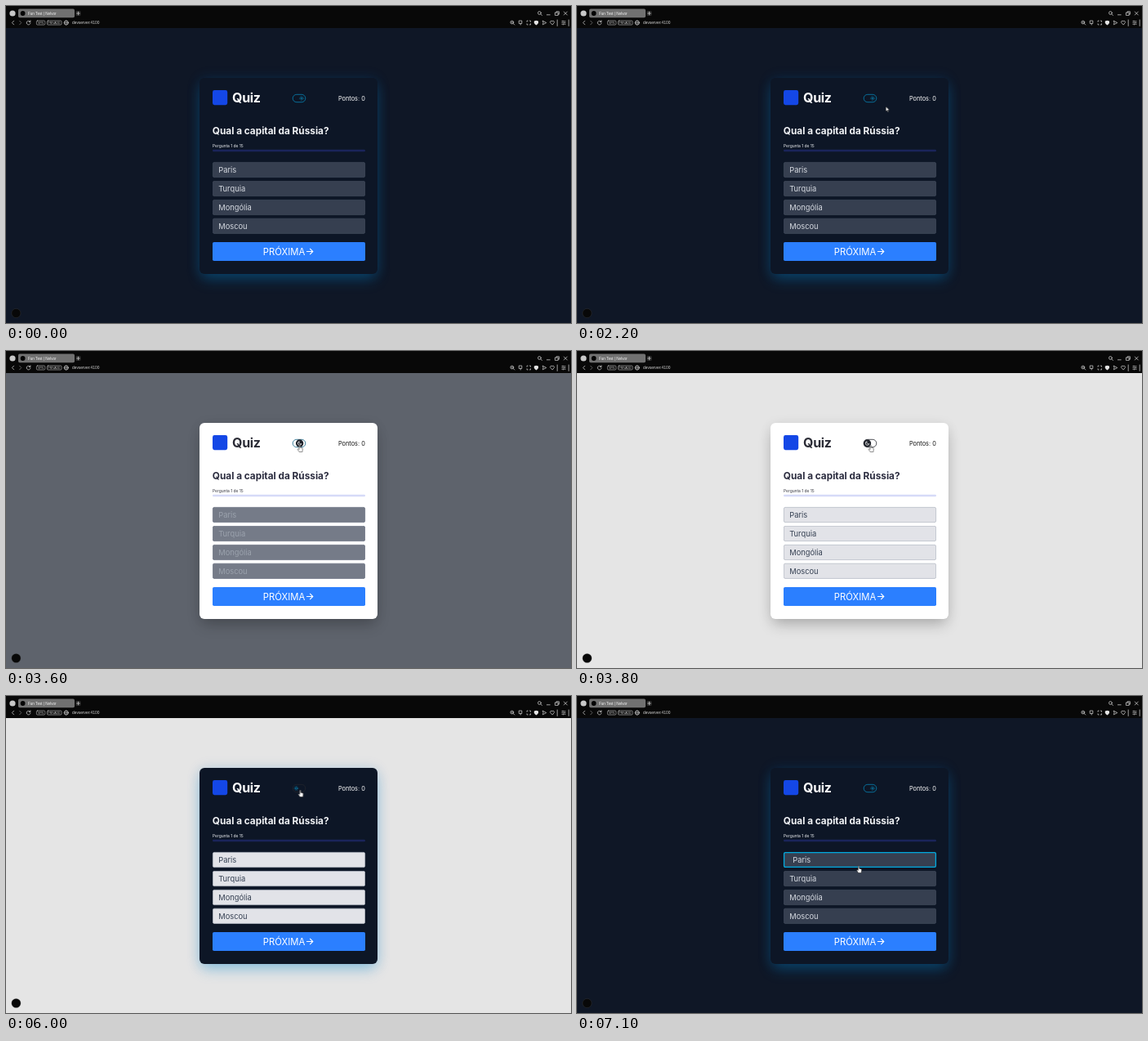
Write an HTML page that moves like this. It is 692 px wide and 388 px high and loops after 8 s.

```html
<!DOCTYPE html>
<html lang="pt">
<head>
<meta charset="utf-8">
<title>Quiz</title>
<style>
/* --c flips the card at once, --p eases page and options (0 dark, 1 light) */
@property --c { syntax: "<number>"; inherits: true; initial-value: 0; }
@property --p { syntax: "<number>"; inherits: true; initial-value: 0; }
@property --hand { syntax: "<number>"; inherits: true; initial-value: 0; }

html, body { margin: 0; width: 100%; height: 100%; overflow: hidden; background: #0f1726; }

#stage {
  --hard: calc(var(--c) * 100%);
  --soft: calc(var(--p) * 100%);
  position: relative; width: 692px; height: 388px; overflow: hidden;
  background: color-mix(in srgb, #e5e5e5 var(--soft), #0f1726);
  animation: flip 8s step-end infinite, fade 8s infinite, pointer 8s step-end infinite;
}
#stage, .knob, .cursor, .ring, .shift {
  animation-play-state: paused;
  animation-delay: calc(var(--t, 0) * -1ms);
}

#card {
  position: absolute; left: 237px; top: 88px; width: 218px; height: 240px; border-radius: 6px;
  background: color-mix(in srgb, #fff var(--hard), #0d1626);
  box-shadow:
    0 9px 18px -3px color-mix(in srgb, rgb(0 0 0 / .24) var(--hard), rgb(0 140 210 / .32)),
    0 1px 16px color-mix(in srgb, rgb(0 0 0 / .06) var(--hard), rgb(0 110 190 / .2));
}
svg { position: absolute; inset: 0; display: block; }
text { font-family: Inter, sans-serif; }

.title { font-size: 16px; font-weight: 700; letter-spacing: -.3px; fill: color-mix(in srgb, #2b2c36 var(--hard), #fff); }
.score { font-size: 7.35px; fill: color-mix(in srgb, #111 var(--hard), #fff); }
.ask { font-size: 11.8px; font-weight: 700; fill: color-mix(in srgb, #2b2c3f var(--hard), #f1f3f6); }
.step { font-size: 4.9px; fill: color-mix(in srgb, #33343e var(--hard), #f1f3f6); }
.track { fill: color-mix(in srgb, #d6dbf8 var(--hard), #1a245a); }
.opt rect {
  fill: color-mix(in srgb, #e2e3e8 var(--soft), #363f50);
  stroke: color-mix(in srgb, #b7bbc6 var(--soft), #3f495a); stroke-width: .8;
}
.opt text { font-size: 9.35px; fill: color-mix(in srgb, #364153 var(--soft), #d6dae1); }
.opt .ring { fill: none; stroke: #00a9de; stroke-width: 1.3; opacity: 0; animation: ring 8s infinite; }
.shift { animation: shift 8s infinite; }
.next { font-size: 11.3px; fill: #fff; }

.pill { fill: none; stroke: color-mix(in srgb, #22252c var(--soft), #0783b4); stroke-width: .8; }
.knob { transform: translate(calc(362px - var(--p) * 6.5px), 113px); }
.sun { opacity: calc(1 - var(--c)); stroke: #0a93c6; fill: none; }
.moon { opacity: var(--c); }

.line { fill: none; stroke: #c4c4c4; stroke-width: .8; stroke-linecap: round; stroke-linejoin: round; }
.bar text { font-family: "Liberation Sans", Arial, sans-serif; }

.cursor { opacity: 0; animation: travel 8s linear infinite; }
.cursor path { fill: #fff; stroke: #111; stroke-width: .5; stroke-linejoin: round; }
.arrow { opacity: calc(1 - var(--hand)); }
.point { opacity: var(--hand); }

@keyframes flip { 0% { --c: 0 } 44.5% { --c: 1 } 74.5%, 100% { --c: 0 } }
@keyframes fade {
  0%, 43.875% { --p: 0; animation-timing-function: cubic-bezier(.4, 0, .2, 1) }
  47.625%, 75% { --p: 1; animation-timing-function: cubic-bezier(.4, 0, .2, 1) }
  78.75%, 100% { --p: 0 }
}
@keyframes pointer {
  0% { --hand: 0 } 33% { --hand: 1 } 55.5% { --hand: 0 }
  63% { --hand: 1 } 79% { --hand: 0 } 83%, 100% { --hand: 1 }
}
@keyframes ring {
  0%, 85% { opacity: 0; animation-timing-function: cubic-bezier(.4, 0, .2, 1) }
  88.75%, 100% { opacity: 1 }
}
@keyframes shift {
  0%, 85% { transform: none; animation-timing-function: cubic-bezier(.4, 0, .2, 1) }
  88.75%, 100% { transform: translateX(4px) }
}
@keyframes travel {
  0%, 4.4% { opacity: 0; transform: translate(493px, 278px) }
  4.5%, 5% { opacity: 1; transform: translate(493px, 278px); animation-timing-function: ease-out }
  11.25%, 21.25% { opacity: 1; transform: translate(473px, 255px) }
  27.5% { opacity: 1; transform: translate(378.4px, 123px); animation-timing-function: ease-out }
  32.5% { opacity: 1; transform: translate(361px, 114px) }
  33.75%, 53.75% { opacity: 1; transform: translate(359.6px, 115px); animation-timing-function: ease-in-out }
  58.75% { opacity: 1; transform: translate(374.5px, 142.5px); animation-timing-function: ease-in-out }
  63.75%, 77.5% { opacity: 1; transform: translate(360.4px, 115px); animation-timing-function: ease-in-out }
  85%, 100% { opacity: 1; transform: translate(345px, 208px) }
}
</style>
</head>
<body>
<div id="stage">
  <div id="card"></div>
  <svg width="692" height="388" viewBox="0 0 692 388">
    <!-- browser bar -->
    <g class="bar">
      <rect width="692" height="27" fill="#080808"/>
      <circle cx="8" cy="9" r="3.6" fill="#c8c8c8"/>
      <rect x="15" y="3.6" width="69" height="10.6" rx="1.8" fill="#717171"/>
      <circle cx="20.6" cy="9" r="2.9" fill="#050505"/>
      <text x="27" y="10.6" font-size="4.6" fill="#f2f2f2">Fun Test | Nelvor</text>
      <rect x="85.4" y="6" width="6" height="6" rx="1" fill="#2c2c2c"/>
      <g class="line">
        <path d="M86.7 9h3.6M88.5 7.2v3.6"/>
        <path d="M9.6 18.2 7.4 20.5 9.6 22.8"/>
        <path d="M16.6 18.2 18.8 20.5 16.6 22.8" stroke="#777"/>
        <path d="M29.5 19a2.4 2.4 0 1 0 .5 2M29.9 17.8v1.7h-1.7"/>
        <rect x="37.4" y="18" width="10.4" height="5" rx="1.2" stroke-width=".6"/>
        <rect x="50.4" y="18" width="17.6" height="5" rx="1.2" stroke-width=".6"/>
        <circle cx="73.8" cy="20.5" r="2.6"/>
        <ellipse cx="73.8" cy="20.5" rx="1.1" ry="2.6" stroke-width=".5"/>
        <path d="M71.2 20.5h5.2" stroke-width=".5"/>
        <circle cx="653.4" cy="8.5" r="1.9"/><path d="M654.8 9.9 656.4 11.5"/>
        <path d="M662.4 10.8h3.8"/>
        <path d="M672.8 8h3.4v3.4h-3.4zM674 8V6.8h3.4v3.4h-1.2"/>
        <path d="M683.3 7 687.3 11M687.3 7 683.3 11"/>
        <circle cx="619.8" cy="20" r="1.9"/><path d="M621.2 21.4 622.8 23M619 20h1.6"/>
        <path d="M628.6 18h3.2v3.4h-3.2zM630.2 21.4v1.6"/>
        <path d="M638 19.2v-1.1h1.1M641.4 18.1h1.1v1.1M642.5 21.8v1.1h-1.1M639.1 22.9H638v-1.1"/>
        <path d="M657.4 18.2 661.8 20.5 657.4 22.8 658 20.5z"/>
        <path d="M669 22.8 666.7 20.3a1.3 1.3 0 0 1 2.3-1.4 1.3 1.3 0 0 1 2.3 1.4z"/>
        <path d="M675.2 17v7.4M689.2 17v7.4"/>
        <path d="M680.8 18.6h4.4M680.8 20.5h4.4M680.8 22.4h4.4M682 18v1.2M684 19.9v1.2M682.4 21.8v1.2" stroke-width=".6"/>
      </g>
      <path d="M649.4 17.7 652 18.6V20.6Q651.8 22.4 649.4 23.4 647 22.4 646.8 20.6V18.6z" fill="#e4e4e4"/>
      <text x="39" y="21.7" font-size="3.4" fill="#ccc">VPN</text>
      <text x="51.5" y="21.7" font-size="3.4" fill="#ccc">PRIVADO</text>
      <text x="81" y="22.2" font-size="4.85" fill="#d0d0d0">devserver:4100</text>
    </g>

    <!-- header -->
    <rect x="253" y="103" width="18.2" height="18.2" rx="2.4" fill="#1447e6"/>
    <text class="title" x="277" y="118">Quiz</text>
    <text class="score" x="439.8" y="115.7" text-anchor="end">Pontos: 0</text>
    <rect class="pill" x="351.2" y="108.3" width="15.6" height="9.4" rx="4.7"/>
    <g class="knob">
      <g class="sun">
        <circle r="1.1" stroke-width=".7"/>
        <circle r="2.3" stroke-width=".9" stroke-dasharray=".6 1.206"/>
      </g>
      <g class="moon">
        <circle r="4.7" fill="#20232b"/>
        <path d="M-.4-2.3A2.3 2.3 0 1 0 2.3.5 2 2 0 0 1-.4-2.3z" fill="none" stroke="#fff" stroke-width=".7"/>
      </g>
    </g>

    <!-- question -->
    <text class="ask" x="252.8" y="157.4">Qual a capital da Rússia?</text>
    <text class="step" x="253" y="172.9">Pergunta 1 de 15</text>
    <rect class="track" x="253" y="175.8" width="187" height="2.5" rx="1.2"/>

    <g class="opt" transform="translate(253 191)">
      <rect x=".4" y=".4" width="186.2" height="18.2" rx="1.6"/>
      <rect class="ring" x=".6" y=".6" width="185.8" height="17.8" rx="1.6"/>
      <text class="shift" x="7.2" y="12.9">Paris</text>
    </g>
    <g class="opt" transform="translate(253 214)">
      <rect x=".4" y=".4" width="186.2" height="18.2" rx="1.6"/>
      <text x="7.2" y="12.9">Turquia</text>
    </g>
    <g class="opt" transform="translate(253 237)">
      <rect x=".4" y=".4" width="186.2" height="18.2" rx="1.6"/>
      <text x="7.2" y="12.9">Mongólia</text>
    </g>
    <g class="opt" transform="translate(253 259.8)">
      <rect x=".4" y=".4" width="186.2" height="18.2" rx="1.6"/>
      <text x="7.2" y="12.9">Moscou</text>
    </g>

    <rect x="253" y="289" width="187" height="23" rx="1.8" fill="#2b7fff"/>
    <text class="next" x="314.8" y="304.6">PRÓXIMA</text>
    <path d="M368 300.5h7.8M372.2 296.9 375.8 300.5 372.2 304.1" fill="none" stroke="#fff" stroke-width="1.1"/>

    <circle cx="12.4" cy="376" r="5.6" fill="#080808" stroke="#4a4a4a" stroke-opacity=".5" stroke-width=".6"/>

    <g class="cursor">
      <path class="arrow" d="M0 0V6L1.4 4.8 2.3 6.9 3.2 6.5 2.3 4.5H4.2Z"/>
      <path class="point" d="M-.7.7Q0-.5.7.7V3.2L3 3.7Q3.8 4 3.7 5L3.2 8.6H-.4L-2.4 5.6Q-2.3 4.5-1.3 5L-.7 5.6Z"/>
    </g>
  </svg>
</div>
<script>
const LOOP = 8000, TICK = 100;
const stage = document.getElementById("stage");
const start = performance.now();

function draw() {
  const time = (performance.now() - start) % LOOP;
  stage.style.setProperty("--t", Math.floor(time / TICK) * TICK);
  requestAnimationFrame(draw);
}
draw();
</script>
</body>
</html>
```
